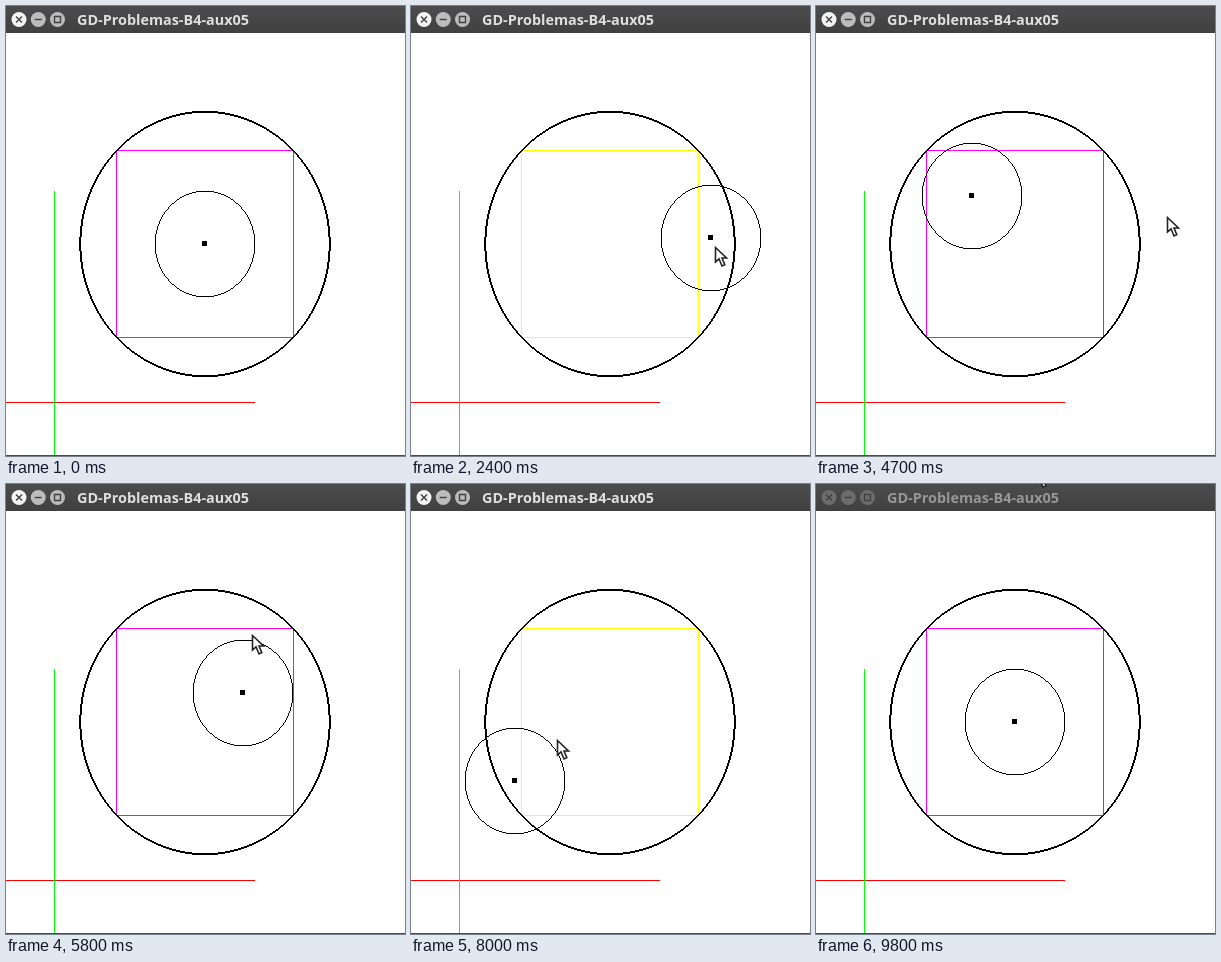
Write an HTML page with a canvas that moves like this. It is 399 px wide and 450 px high and loops after 10 s.

```html
<!DOCTYPE html>
<html lang="pt">
<head>
<meta charset="utf-8">
<title>GD-Problemas-B4-aux05</title>
<style>
  html, body { margin: 0; width: 100%; height: 100%; overflow: hidden; background: #fff; }
  canvas { display: block; }
</style>
</head>
<body>
<canvas id="stage" width="399" height="450"></canvas>
<script>
const ctx = document.getElementById('stage').getContext('2d');
const LOOP = 10000, STEP = 100, ENTER = 300, RELEASE = 8600, BLUR = 9800;
const UNIT = { x: 399 / 400, y: 423 / 400 };
const HOME = [199, 238], BIG = 125, SMALL = 50;
const BOX = { left: 110, top: 144, width: 178, height: 188 };

// Turning points of the drag: time, x, y
const DRAG = [
  [1200, ...HOME], [1800, 300, 232], [2400, 300, 232], [3600, 207, 369],
  [3900, 207, 369], [4700, 156, 190], [5000, 123, 172], [6400, 323, 236],
  [6800, 257, 151], [7600, 78, 250], [8000, 104, 297], [8400, 220, 251]
];

// Pointer relative to the circle; it slips while the circle is blocked
const SLIP = [
  [ENTER, 182, -73], [1100, 4, -4], [1800, 4, 8], [2400, 4, 8], [3600, 7, -4],
  [3900, 164, 15], [4700, 195, 20], [5200, 9, -57], [6800, 9, -63],
  [8000, 42, -42], [8500, 34, -42], [RELEASE, 55, -28], [9000, 60, -20], [BLUR, 21, -255]
];

function along(keys, time) {
  const next = keys.findIndex(key => key[0] > time);
  const [t1, x1, y1] = keys.at(next);
  const [t0, x0, y0] = keys[next - 1] || keys.at(next && -1);
  const k = t1 === t0 ? 0 : Math.max(0, (time - t0) / (t1 - t0));
  return [Math.round(x0 + (x1 - x0) * k), Math.round(y0 + (y1 - y0) * k)];
}

function rect(x, y, w, h, color) {
  ctx.fillStyle = color;
  ctx.fillRect(x, y, w, h);
}

// Hard-edged ellipse, one pixel run per column or row
function ellipse([cx, cy], radius, width) {
  const rx = radius * UNIT.x, ry = radius * UNIT.y, diagonal = Math.hypot(rx, ry);
  const spanX = Math.ceil(rx * rx / diagonal), spanY = Math.ceil(ry * ry / diagonal);
  for (const side of [-1, 1]) {
    for (let x = -spanX; x < spanX; x++) {
      const y = side * ry * Math.sqrt(1 - ((x + 0.5) / rx) ** 2);
      rect(cx + x, Math.round(cy + y - width / 2), 1, width, '#000');
    }
    for (let y = -spanY; y < spanY; y++) {
      const x = side * rx * Math.sqrt(1 - ((y + 0.5) / ry) ** 2);
      rect(Math.round(cx + x - width / 2), cy + y, width, 1, '#000');
    }
  }
}

function drawTitleBar(active) {
  const shade = ctx.createLinearGradient(0, 0, 0, 27);
  shade.addColorStop(0, '#4c4c4c');
  shade.addColorStop(1, '#404040');
  rect(0, 0, 399, 27, shade);
  const glyphs = ['M-3-3L3 3M3-3L-3 3', 'M-3.5 0H3.5', 'M-3-3H3V3H-3Z'];
  glyphs.forEach((glyph, i) => {
    ctx.save();
    ctx.translate(13 + i * 19.25, 13.5);
    ctx.fillStyle = !active ? '#6c6c6c' : i ? '#bcbcbc' : '#f4f4f4';
    ctx.beginPath();
    ctx.arc(0, 0, 7.5, 0, 7);
    ctx.fill();
    ctx.strokeStyle = '#404040';
    ctx.lineWidth = 1.4;
    ctx.stroke(new Path2D(glyph));
    ctx.restore();
  });
  ctx.font = 'bold 14.4px "Open Sans", sans-serif';
  ctx.fillStyle = active ? '#dfdfdf' : '#979797';
  ctx.fillText(document.title, 71, 19);
}

function boxColor([x, y]) {
  const dx = x - HOME[0], dy = y - HOME[1];
  if (Math.abs(dx) <= BOX.width / 2 && Math.abs(dy) <= BOX.height / 2) return '#f0f';
  return Math.hypot(dx / UNIT.x, dy / UNIT.y) > 0.98 * BIG ? '#0ff' : '#ff0';
}

function drawPointer([x, y]) {
  ctx.save();
  ctx.translate(x + 0.5, y + 0.5);
  const arrow = new Path2D('M0 1V15.5L3.5 12.3L6.5 19.5L9.3 18.2L6.5 11.5H11Z');
  ctx.fillStyle = '#fff';
  ctx.fill(arrow);
  ctx.strokeStyle = '#222';
  ctx.lineWidth = 1.6;
  ctx.stroke(arrow);
  ctx.restore();
}

function draw(time) {
  const centre = time < RELEASE ? along(DRAG, time) : HOME;
  const [x, y] = centre;
  const [dx, dy] = along(SLIP, time);
  rect(0, 0, 399, 450, '#fff');
  drawTitleBar(time < BLUR);
  rect(0, 396, 249, 1, '#f00');
  rect(48, 185, 1, 264, '#0f0');
  rect(0, 449, 399, 1, '#4c4c4c');
  ctx.strokeStyle = boxColor(centre);
  ctx.lineWidth = 1;
  ctx.strokeRect(BOX.left + 0.5, BOX.top + 0.5, BOX.width - 1, BOX.height - 1);
  ellipse(HOME, BIG, 2);
  ellipse(centre, SMALL, 1);
  rect(x - 3, y - 3, 5, 5, '#000');
  if (time >= ENTER) drawPointer([x + dx, y + dy]);
}

function tick() {
  draw(Math.floor(performance.now() % LOOP / STEP) * STEP);
  requestAnimationFrame(tick);
}
tick();
</script>
</body>
</html>
```
